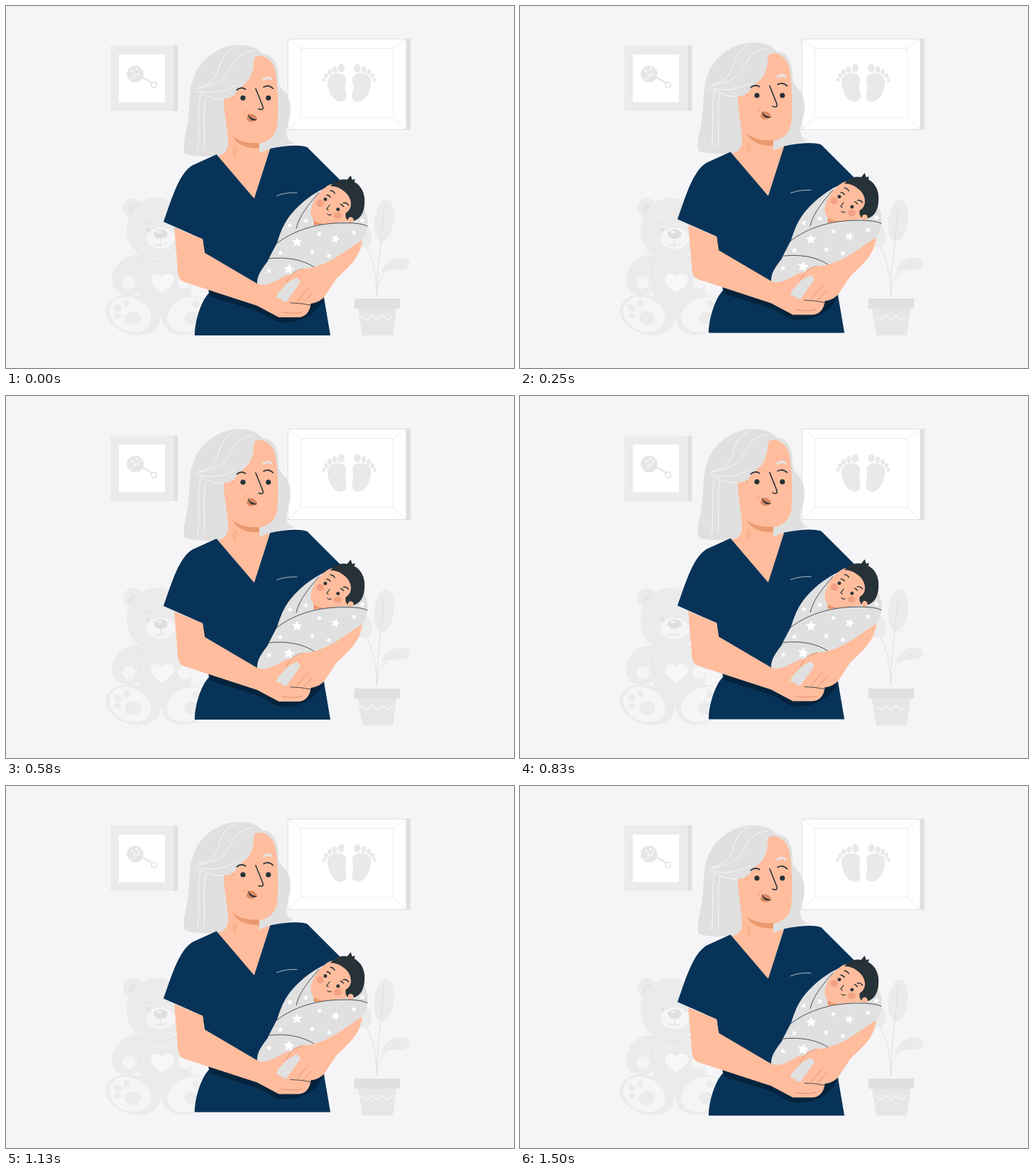
These frames come from a looping animation (700x500 px, 1.54 s). An HTML page:

```html
<!DOCTYPE html>
<html lang="en">
<head>
<meta charset="utf-8">
<title>Grandmother and baby</title>
<style>
html, body { margin: 0; width: 100%; height: 100%; overflow: hidden; background: #f5f5f8; }
svg { display: block; width: 100%; height: 100%; }
.line { fill: none; stroke-linecap: round; stroke-linejoin: round; }
</style>
</head>
<body>
<svg viewBox="0 0 700 500">
  <rect width="700" height="500" fill="#f5f5f8"/>

  <g id="rattle-frame">
    <path d="M144 54.500H237V145H144Z" fill="#ebebeb"/>
    <path d="M231 54.500H237V145H231Z" fill="#e0e0e0"/>
    <path d="M155.500 67H219V133H155.500Z" fill="#fff"/>
    <g class="line" stroke="#e0e0e0">
      <path d="M187 98L201 106" stroke-width="2"/>
      <circle cx="204" cy="109" r="3.800" stroke-width="1.500"/>
    </g>
    <circle cx="178" cy="94" r="11.500" fill="#e6e6e6"/>
    <path class="line" d="M170 101Q181 100 186 87" stroke="#fff" stroke-width=".8"/>
    <g fill="#fff"><circle cx="174" cy="90" r="1.500"/><circle cx="180" cy="87" r="1.500"/><circle cx="177" cy="95" r="1.500"/><circle cx="182" cy="94" r="1.300"/></g>
  </g>

  <g id="print-frame">
    <path d="M388 45H557.500V171H388Z" fill="#e0e0e0"/>
    <path d="M389 46H551V170H389Z" fill="#fff"/>
    <path class="line" d="M389 46L406 58.500H534V154H406V58.500M551 46L534 58.500M389 170L406 154M551 170L534 154" stroke="#ebebeb"/>
    <g fill="#e9e9e9" id="feet"></g>
  </g>

  <g id="bear" fill="#ebebeb">
    <circle cx="175" cy="279" r="13.500"/><circle cx="237" cy="279" r="13.500"/>
    <ellipse cx="177" cy="282" rx="8" ry="8" fill="#e4e4e4"/>
    <path d="M182 345C165 341 147 358 146 377C146 393 157 400 170 399L184 395V430H255V345Z"/>
    <ellipse cx="207" cy="309" rx="41" ry="44"/>
    <path class="line" d="M172 339C185 354 220 358 240 344M185 352C179 364 184 381 190 396" stroke="#dfdfdf" stroke-width=".7"/>
    <ellipse cx="213" cy="321" rx="20" ry="14.500" fill="#f5f5f5"/>
    <ellipse cx="213" cy="315" rx="9.500" ry="6.500" fill="#dedede"/>
    <ellipse cx="211" cy="312" rx="4" ry="1.700" fill="#f2f2f2"/>
    <path class="line" d="M213 322V329M205 329Q213 333 221 328M192 301Q195 297 200 299" stroke="#dcdcdc"/>
    <circle cx="196" cy="309" r="2.200" fill="#dcdcdc"/>
    <circle cx="169" cy="382" r="9" fill="#f5f5f5"/>
    <circle cx="246" cy="382" r="9" fill="#f5f5f5"/>
    <path d="M215 396C205 389 199 383 200 376C202 369 211 368 215 374C220 368 230 369 232 376C233 384 223 391 215 396Z" fill="#f7f7f7"/>
    <ellipse cx="175" cy="426.500" rx="38.500" ry="27" transform="rotate(18 175 426.500)"/>
    <ellipse cx="248" cy="426.500" rx="34" ry="27" transform="rotate(-18 248 426.500)"/>
    <ellipse cx="171" cy="426" rx="30" ry="23" transform="rotate(25 171 426)" fill="#f5f5f5"/>
    <ellipse cx="251" cy="426" rx="30" ry="23" transform="rotate(-25 251 426)" fill="#f5f5f5"/>
    <ellipse cx="175" cy="431" rx="11" ry="9.500"/><ellipse cx="256" cy="431" rx="10" ry="9"/>
    <ellipse cx="154" cy="417" rx="6" ry="4.500" transform="rotate(30 154 417)"/>
    <ellipse cx="166" cy="411" rx="4" ry="5"/><ellipse cx="154" cy="428" rx="5" ry="4"/>
    <ellipse cx="262" cy="412" rx="5" ry="5"/>
  </g>

  <g id="plant" fill="#ebebeb">
    <ellipse cx="521" cy="296" rx="13.500" ry="29.500" transform="rotate(7 521 296)"/>
    <path d="M517 369C521 354 533 345 549 348C558 350 558 358 552 362C543 367 530 361 517 369Z"/>
    <path d="M486 304C499 300 507 313 503 327C499 336 490 334 480 331Z"/>
    <path class="line" d="M511 400C510 370 517 330 521 276M511 398C511 380 520 364 543 356M511 398C510 370 505 345 495 331" stroke="#e0e0e0"/>
    <path d="M485 418H538L533 455H491Z" fill="#e6e6e6"/>
    <path d="M480 404H543V418H480Z" fill="#e0e0e0"/>
    <path class="line" d="M490 429L497 434L504 427L511 434L518 427L525 434L533 428" stroke="#f8f8f8" stroke-width="1.200"/>
  </g>

  <g id="family">
    <path d="M318 54C337 53 347 60 353 66C366 66 374 78 375 92L376 108C380 117 391 120 392 140C393 160 384 168 387 180C389 186 392 188 397 189C382 194 373 198 349 204L302 208C280 208 258 208 247 204C242 200 247 181 250 163C254 140 251 119 258 100C267 73 293 55 318 54Z" fill="#e0e0e0"/>
    <path d="M343 70C356 65 369 77 371 89C375 107 376 143 374 164C372 180 361 188 349 190V203L364 197L342 267L288 208C299 206 305 203 306 190C306 170 300 149 300 128L320 108Z" fill="#ffbd9d"/>
    <path d="M312 179C321 188 336 190 349 189V196C333 198 317 191 312 179Z" fill="#eb996e"/>
    <path d="M261 117C273 92 277 68 318 55C342 53 351 62 353 67L343 70C340 76 343 85 337 97C332 108 323 110 318 118C313 128 306 128 298 128C284 130 272 121 261 117Z" fill="#e0e0e0"/>
    <g class="line" stroke="#fafafa" stroke-width=".9">
      <path d="M261 118C273 121 284 130 299 128M262 115C277 110 292 109 304 95C312 83 316 65 340 62M265 112C283 109 290 98 294 84C299 69 305 61 318 56M266 117C282 122 300 119 316 110M268 122C263 145 268 171 264 198M275 126C271 150 275 173 273 198"/>
    </g>

    <g class="line" stroke="#263238">
      <path d="M318 116Q324 111 330 115M355 112Q362 108 368 114" stroke-width="1.700"/>
      <path d="M344 114L354 139C355 143 352 144 348 142" stroke-width="1.500"/>
    </g>
    <path class="line" d="M355 101.500Q360 97 365 101" stroke="#e6e4e3" stroke-width="3.200"/>
    <circle cx="326.500" cy="127" r="3.500" fill="#263238"/><circle cx="361.500" cy="127" r="3.500" fill="#263238"/>
    <path d="M333 150C339 148 344 150 346 156C343 161 335 162 331 156C332 154 333 152 333 150Z" fill="#d98760"/>
    <path d="M333.500 148C335 154 340 156 346.500 157C339 160 334 156 333.500 148Z" fill="#263238"/>
    <path class="line" d="M333 144Q329 145 328 151M311 125L314 127L311 129M313 192C317 196 310 200 315 207M317 194C319 198 314 201 316 206" stroke="#eb996e" stroke-width=".8"/>

    <path d="M290 205L342 266L364 197C383 193 404 191 415 195L462 242L448 335L438 402L447 455H260C260 437 268 408 280 396L271 322L217 298C227 270 238 231 257 220Z" fill="#083358"/>
    <path d="M278 388L348 413L376 429L438 402C434 419 412 439 380 437C367 436 358 425 342 420L281 401Z" fill="#04233d"/>
    <path class="line" d="M373 262Q386 257 401 258" stroke="#a9b9c6"/>

    <path d="M346 383C346 371 353 363 361 352C373 336 373 326 378 314C385 294 399 278 418 264C432 254 446 246 465 247L490 273C498 286 499 295 498 304C495 320 489 329 470 342L418 386L386 410L372 403V386C361 390 348 388 346 383Z" fill="#e0e0e0"/>
    <path d="M442 249C429 258 419 274 420 288C421 293 425 294 424 301C439 305 464 296 477 298L481 287L470 252C459 244 449 244 442 249Z" fill="#ffbd9d"/>
    <path d="M424 296Q432 301 441 301L424 303Z" fill="#eb996e"/>
    <path d="M447 249C455 239 464 239 470 240L475 234L477 240L481 239L480 243C491 249 495 261 494 272C494 285 488 295 478 297C471 299 467 294 468 286C479 280 477 264 466 256C458 249 451 249 447 249Z" fill="#263238"/>
    <ellipse cx="475" cy="296" rx="4" ry="4.500" fill="#ffbd9d"/>
    <g fill="#f3a184"><circle cx="433" cy="272.500" r="5"/><ellipse cx="457" cy="289.500" rx="5.500" ry="4.500"/></g>
    <g fill="#263238"><circle cx="440" cy="267" r="2.400"/><circle cx="457.500" cy="281" r="2.400"/></g>
    <g class="line" stroke="#263238" stroke-width="1.400">
      <path d="M447 255Q451 255 453 259M465 272Q469 271 472 275M442 261Q445 261 447 264M461 274Q463 274 465 277" />
      <path d="M446 275L442 280L444 282M443 287Q445 290 448 288" stroke-width="1.100"/>
    </g>
    <path d="M373 328C397 309 429 301 455 300C475 299 490 300 498 304C497 319 487 329 470 341L425 362L361 351Z" fill="#e0e0e0"/>
    <path class="line" d="M373 328C397 309 429 301 455 300C475 299 490 300 498 304M361 349C386 346 409 350 425 361M400 307C404 289 418 273 431 258" stroke="#263238" stroke-width=".8"/>
    <g fill="#fff" id="stars"></g>

    <path d="M232 306L271 322L274 341L347 384C361 388 372 379 382 374C393 369 398 372 389 381L373 398L384 409L394 406L420 411C419 423 412 430 402 430H376L346 414L245 381Q238 378 237 369Z" fill="#ffbd9d"/>
    <path d="M387 382C390 372 397 365 409 363C442 361 464 340 491 323C488 349 471 361 455 377L439 401C432 411 413 415 392 409L382 407L405 382L402 376C396 377 392 382 387 382Z" fill="#ffbd9d"/>
    <path d="M372 402L391 380L401 375L406 381L386 409Z" fill="#e0e0e0"/>
    <g class="line" stroke="#d98760" stroke-width=".8">
      <path d="M387 382C390 372 397 366 409 363M401 408L417 390M410 410L423 396M380 423Q397 426 408 423"/>
      <path d="M392 410Q405 410 419 413" stroke="#263238"/>
    </g>
  </g>
</svg>
<script>
const NS = 'http://www.w3.org/2000/svg';
const $ = id => document.getElementById(id);
function add(parent, tag, attrs) {
  const el = document.createElementNS(NS, tag);
  for (const k in attrs) el.setAttribute(k, attrs[k]);
  parent.appendChild(el);
}

const toes = [[462, 86, 4.8, 5.7], [453, 88, 3.5, 4.7], [446, 91, 3, 4], [441, 96, 2.8, 3.5], [438, 102, 2.3, 2.8]];
for (const flip of ['', 'translate(946 0) scale(-1 1)']) {
  add($('feet'), 'path', {
    d: 'M443 104C443 96 452 92 460 93C468 94 470 101 468 108C466 114 470 120 469 126C468 133 459 134 453 129C447 124 443 113 443 104Z',
    transform: flip
  });
  for (const [cx, cy, rx, ry] of toes) add($('feet'), 'ellipse', { cx, cy, rx, ry, transform: flip });
}

function star(x, y, r, turn) {
  const pts = [];
  for (let i = 0; i < 10; i++) {
    const a = i * Math.PI / 5 - Math.PI / 2 + turn;
    const q = i % 2 ? r * 0.47 : r;
    pts.push((x + q * Math.cos(a)).toFixed(2) + ',' + (y + q * Math.sin(a)).toFixed(2));
  }
  add($('stars'), 'polygon', { points: pts.join(' ') });
}
[[401, 326, 7.5], [390, 363.5, 8], [454, 322, 6.5], [391, 303, 4], [413, 297, 4], [432, 315, 4],
 [422, 340, 4], [378, 341, 4], [445, 345, 4], [362.5, 366, 4], [479.5, 313, 4], [491, 296, 4]]
  .forEach(([x, y, r], i) => star(x, y, r, i % 3 * 0.15));

// Breathing motion: time and height, joined by a smooth periodic curve
const LOOP = 1540, STEPS = 37;
const keys = [[0, 0], [250, -3.6], [580, -8], [700, -8.7], [830, -8.4], [1130, -4.4], [1330, -1.6], [1500, 0.3]];
function key(i) {
  const n = keys.length, turn = Math.floor(i / n);
  const [t, y] = keys[i - turn * n];
  return [t + turn * LOOP, y];
}
function slope(i) {
  const a = key(i - 1), b = key(i + 1);
  return (b[1] - a[1]) / (b[0] - a[0]);
}
function lift(t) {
  let i = 0;
  while (key(i + 1)[0] <= t) i++;
  const [t0, y0] = key(i), [t1, y1] = key(i + 1);
  const d = t1 - t0, u = (t - t0) / d, v = 1 - u;
  return v * v * (1 + 2 * u) * y0 + u * u * (3 - 2 * u) * y1
    + d * u * v * (v * slope(i) - u * slope(i + 1));
}

const family = $('family');
function draw(ms) {
  const step = LOOP / STEPS;
  const n = Math.floor((ms % LOOP + 8) / step) % STEPS;
  family.setAttribute('transform', `translate(0 ${lift(n * step).toFixed(2)})`);
}
let start;
function tick(now) {
  if (start === undefined) start = now;
  draw(now - start);
  requestAnimationFrame(tick);
}
draw(0);
requestAnimationFrame(tick);
</script>
</body>
</html>
```
